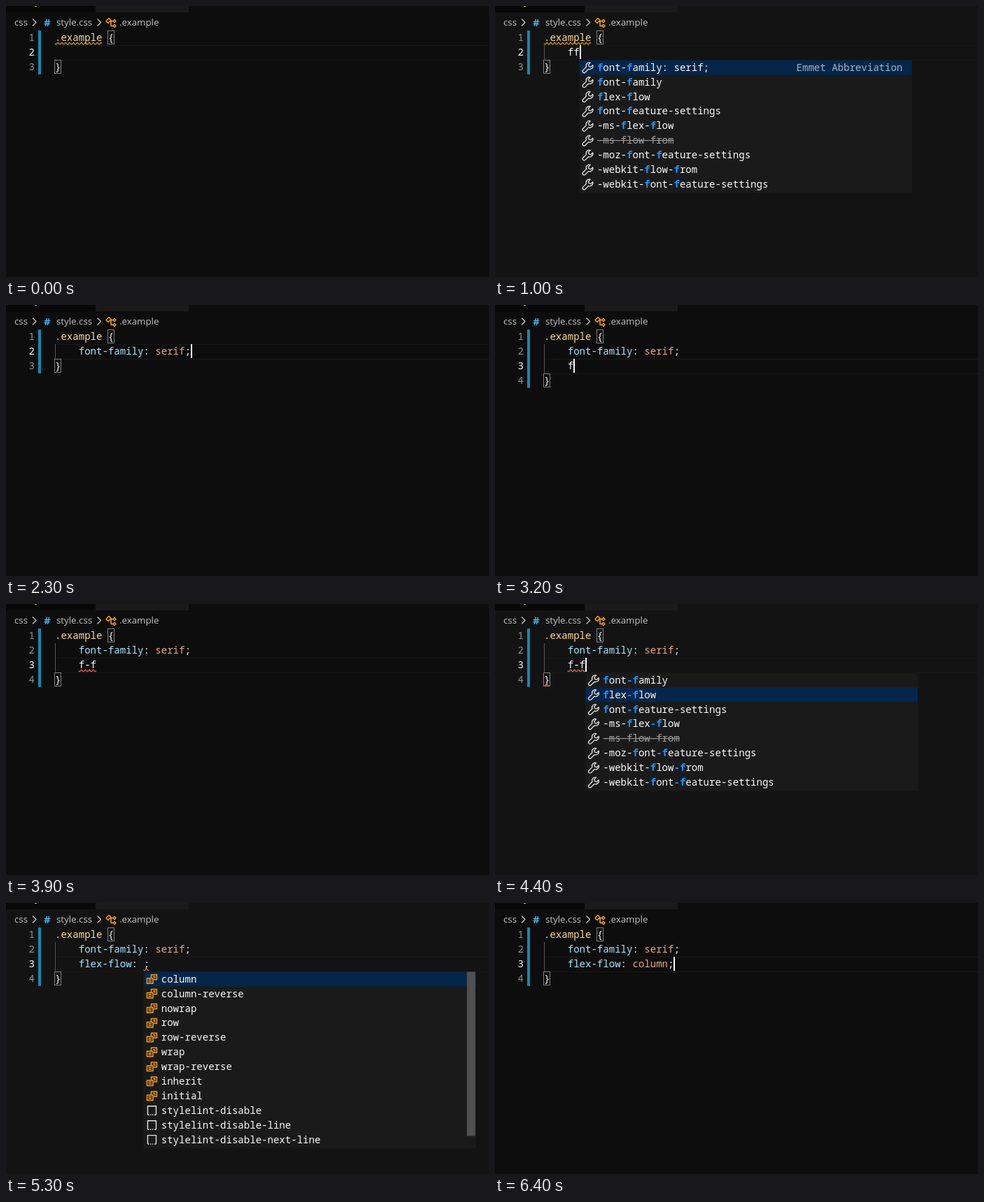
Animation of 690 by 388 pixels, one loop 6.6 s. Source, as an HTML page with a canvas:

```html
<!DOCTYPE html>
<html lang="en">
<head>
<meta charset="utf-8">
<title>Editor completion</title>
<style>
html, body { margin: 0; width: 100%; height: 100%; overflow: hidden; background: #0d0d0d; }
canvas { display: block; }
</style>
</head>
<body>
<canvas id="stage" width="690" height="388"></canvas>
<script>
const ctx = document.getElementById('stage').getContext('2d');
const LOOP = 6600, BLINK = 530;
const CHAR = 8.43, ROW = 20.9, TOP = 35.1, LEFT = 70, INDENT = LEFT + 4 * CHAR;
const MONO_FAMILY = '14.05px "Noto Sans Mono", monospace';
const MONO = '500 ' + MONO_FAMILY, MONO_BOLD = 'bold ' + MONO_FAMILY;
const UI = '13.3px "Open Sans", sans-serif';
const WHITE = '#fafafa', RED = '#f0685c', ORANGE = '#f7a020';

const properties = ['font-family', 'flex-flow', 'font-feature-settings', '-ms-flex-flow',
  '-ms-flow-from', '-moz-font-feature-settings', '-webkit-flow-from', '-webkit-font-feature-settings'];
const values = ['column', 'column-reverse', 'nowrap', 'row', 'row-reverse', 'wrap',
  'wrap-reverse', 'inherit', 'initial'];
const snippets = ['stylelint-disable', 'stylelint-disable-line', 'stylelint-disable-next-line'];

const abbreviationList = { items: ['font-family: serif;', ...properties], selected: 0, detail: 'Emmet Abbreviation' };
const propertyList = selected => ({ items: properties, selected, dash: true });
const valueList = { items: [...values, ...snippets], selected: 0, scrollbar: true };

// Each state holds from its time on; "typed" is the last keystroke, which restarts the caret blink.
const family = 'font-family: serif;';
const states = [
  { at: 0, typed: -600, body: [''], warning: true },
  { at: 700, typed: 700, body: ['f'], warning: true },
  { at: 800, typed: 800, body: ['ff'], warning: true },
  { at: 900, typed: 800, body: ['ff'], warning: true, list: abbreviationList },
  { at: 2000, typed: 2000, body: [family] },
  { at: 3000, typed: 3000, body: [family, ''] },
  { at: 3200, typed: 3200, body: [family, 'f'] },
  { at: 3300, typed: 3300, body: [family, 'f-f'] },
  { at: 3600, typed: 3300, body: [family, 'f-f'], error: [0, 3] },
  { at: 4000, typed: 3300, body: [family, 'f-f'], error: [0, 3], braceError: true, list: propertyList(0) },
  { at: 4200, typed: 3300, body: [family, 'f-f'], error: [0, 3], braceError: true, list: propertyList(1) },
  { at: 4700, typed: 4700, body: [family, 'flex-flow: ;'], caret: 11 },
  { at: 4800, typed: 4700, body: [family, 'flex-flow: ;'], caret: 11, error: [11, 1], list: valueList },
  { at: 5900, typed: 5900, body: [family, 'flex-flow: column;'] }
];

const wrench = new Path2D('M11.6 .9A4.6 4.6 0 0 0 5.9 7L1.2 11.7A2.1 2.1 0 0 0 4.3 14.8L9 10.1A4.6 4.6 0 0 0 15.1 4.4L12.2 7.2L9.6 6.4L8.8 3.8Z');
const enumIcon = new Path2D('M7 6V1.5H15V8.5H10.5M1 6.5H9.5V14H1ZM3 9H7.5M3 11.5H7.5M9.5 4H13M11 6H13');
const structure = new Path2D('M1 5L5 1L8 4L4 8ZM7 5H11M8 5V12H11M11 5L13 3L15 5L13 7ZM11 12L13 10L15 12L13 14Z');

function rect(x, y, w, h, color) {
  ctx.fillStyle = color;
  ctx.fillRect(x, y, w, h);
}

function text(str, x, y, color, font = MONO, align = 'left') {
  ctx.font = font;
  ctx.textAlign = align;
  ctx.fillStyle = color;
  ctx.fillText(str, x, y);
}

function stroke(path, x, y, color, width = 1.4) {
  ctx.save();
  ctx.translate(x, y);
  ctx.strokeStyle = color;
  ctx.lineWidth = width;
  ctx.lineJoin = 'round';
  ctx.stroke(path);
  ctx.restore();
}

function squiggle(x, y, width, color) {
  const wave = new Path2D();
  for (let i = 0; i <= width; i += 0.5) wave.lineTo(i, 1.3 * Math.sin(i * Math.PI / 2.8));
  stroke(wave, x, y, color, 1.2);
}

const lineTop = n => TOP + n * ROW;
const baseline = n => lineTop(n) + 15.2;

function brace(char, x, n) {
  ctx.strokeStyle = '#808080';
  ctx.lineWidth = 1;
  ctx.strokeRect(Math.round(x) - 0.5, Math.round(lineTop(n)) + 0.5, 9, 19);
  text(char, x, baseline(n), WHITE);
}

function declaration(line, n) {
  const [, name, colon, value, end] = line.match(/^([^:]*)(:? ?)([^;]*)(;?)$/);
  const runs = [[name, colon ? '#a8e6ff' : WHITE], [colon, WHITE], [value, '#eba486'], [end, WHITE]];
  let x = INDENT;
  for (const [part, color] of runs) {
    text(part, x, baseline(n), color);
    x += part.length * CHAR;
  }
}

function breadcrumb() {
  const y = 28.4, gray = '#c4c4c4';
  rect(0, 0, 128, 9, '#080808');
  rect(128, 0, 133, 9, '#1a1a1a');
  rect(41, 0, 3, 1, '#c8b878');
  text('css', 12, y, gray, UI);
  text('#', 54, 29, '#4aaee8', 'bold 15px "Open Sans", sans-serif');
  text('style.css', 72, y, gray, UI);
  text('.example', 162, y, gray, UI);
  const chevron = new Path2D('M0 0L5 5L0 10');
  for (const x of [38, 130.5]) stroke(chevron, x, 18.5, gray, 1.3);
  stroke(structure, 142, 16.5, ORANGE, 1.5);
}

function itemIcon(item, x, y) {
  if (values.includes(item)) {
    stroke(enumIcon, x, y, ORANGE, 1.5);
  } else if (snippets.includes(item)) {
    stroke(new Path2D('M2 14V1.5H14V14'), x, y, '#e4e4e4');
    stroke(new Path2D('M2 14H4M5.5 14H7M8.5 14H10M11.5 14H14'), x, y, '#e4e4e4');
  } else {
    stroke(wrench, x, y, '#e4e4e4', 1.3);
  }
}

function completions(list, x, top) {
  const { items, selected, detail, dash, scrollbar } = list;
  rect(x, top, 475, items.length * ROW + 2, '#1a1a1a');
  rect(x, top + selected * ROW, 475, ROW, '#03264a');

  items.forEach((item, i) => {
    const y = top + i * ROW, textX = x + 25.3, base = y + 15.2;
    const deprecated = item === '-ms-flow-from';
    const color = deprecated ? '#a0a0a0' : WHITE;
    itemIcon(item, x + 4, y + 2.7);

    // The typed letters are the first two f's, plus the hyphen when it was typed.
    const matches = new Set();
    if (properties.includes(item) || detail && i === 0) {
      const first = item.indexOf('f'), second = item.indexOf('f', first + 1);
      matches.add(first).add(second);
      if (dash) matches.add(second - 1);
    }
    [...item].forEach((char, k) => {
      const hit = matches.has(k) && !deprecated;
      text(char, textX + k * CHAR, base, hit ? '#1898ff' : color, hit ? MONO_BOLD : MONO);
    });
    if (deprecated) rect(textX, y + 10, item.length * CHAR, 1, color);
  });

  if (detail) text(detail, x + 310, top + 15.2, '#9fb6cc');
  if (scrollbar) rect(x + 462, top, 12, 235, '#505050');
}

function draw(time) {
  const state = states.findLast(s => s.at <= time);
  const { body, list, error } = state;
  const last = body.length, closing = last + 1;
  const caretX = INDENT + (state.caret ?? body[last - 1].length) * CHAR;

  rect(0, 0, 690, 388, list ? '#131313' : '#0d0d0d');
  breadcrumb();

  for (const y of [lineTop(last), lineTop(closing)]) rect(LEFT, Math.round(y), 620, 1, '#191919');
  rect(46, TOP, 4, (closing + 1) * ROW, '#108ab6');
  for (let n = 0; n <= closing; n++)
    text(n + 1, 41, baseline(n), n === last ? WHITE : '#909090', MONO, 'right');

  if (body[0]) rect(LEFT, lineTop(1), 1, last * ROW, '#555');
  text('.example', LEFT, baseline(0), '#ffd998');
  brace('{', LEFT + 9 * CHAR, 0);
  body.forEach((line, i) => declaration(line, i + 1));
  brace('}', LEFT, closing);

  if (state.warning) squiggle(LEFT, lineTop(0) + 18.6, 8 * CHAR, '#d5a21c');
  if (error) squiggle(INDENT + error[0] * CHAR, lineTop(last) + 18.6, error[1] * CHAR, RED);
  if (state.braceError) squiggle(LEFT, lineTop(closing) + 18.6, CHAR, RED);

  if (list) completions(list, caretX, Math.round(lineTop(closing)) + 0.5);
  if (Math.floor((time - state.typed) / BLINK) % 2 === 0)
    rect(Math.round(caretX), Math.round(lineTop(last)), 2, 20, WHITE);
}

function tick() {
  draw(performance.now() % LOOP);
  requestAnimationFrame(tick);
}
tick();
</script>
</body>
</html>
```
